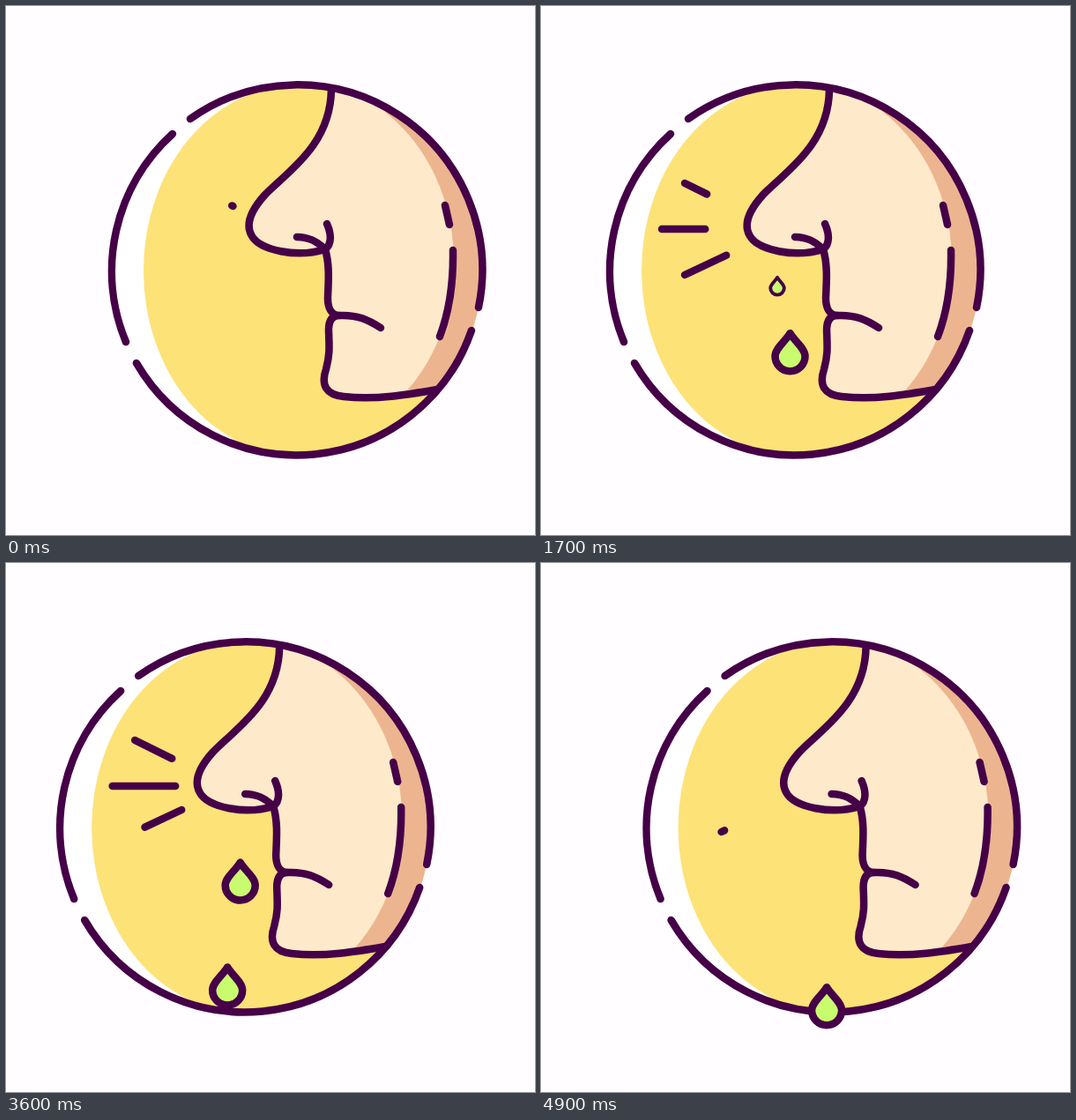
These frames come from a looping animation (600 by 600 pixels, 5 s). An HTML page:

```html
<!DOCTYPE html>
<html lang="en">
<head>
<meta charset="utf-8">
<title>Runny nose</title>
<style>
  html, body { margin: 0; width: 100%; height: 100%; overflow: hidden; background: #fffdff; }
  svg { display: block; width: 100vw; height: 100vh; }
  .ink { fill: none; stroke: #450048; stroke-width: 8.5; stroke-linecap: round; stroke-linejoin: round; }
  .drop { fill: #c9fb6e; }
</style>
</head>
<body>
<svg viewBox="0 0 600 600">
  <defs>
    <clipPath id="disc"><circle cx="330" cy="300" r="210"/></clipPath>
    <clipPath id="face"><use href="#skin"/></clipPath>
    <path id="skin" d="M369 95C368 160 316 190 293 215C277 233 271 248 279 261C288 277 330 286 362 276
      C367 292 366 310 365 331C365 342 369 351 378 351C369 351 366 358 366 368C367 390 367 397 363 412
      C357 430 363 441 383 443C420 447 455 441 489 435L560 435V60H369Z"/>
  </defs>
  <g id="scene">
    <g clip-path="url(#disc)">
      <circle cx="330" cy="300" r="210" fill="#fff"/>
      <ellipse cx="330" cy="300" rx="174" ry="210" fill="#fde278"/>
      <path d="M330 300V510H540V90H330Z" fill="#fde278"/>
      <use href="#skin" fill="#ecb58f"/>
      <ellipse cx="330" cy="290" rx="178" ry="205" fill="#feeaca" clip-path="url(#face)"/>
    </g>
    <path class="ink" d="M209 128A210 210 0 0 1 536 342M528 368A210 210 0 0 1 148 405M136 381A210 210 0 0 1 189 145"/>
    <path class="ink" d="M369 95C368 160 316 190 293 215C277 233 271 248 279 261C288 277 330 286 362 276
      C367 292 366 310 365 331C365 342 369 351 378 351C369 351 366 358 366 368C367 390 367 397 363 412
      C357 430 363 441 383 443C420 447 455 441 489 435"/>
    <path class="ink" d="M378 351C399 350 411 356 425 365M330 262C345 262 354 268 362 276C370 270 369 258 364 247"/>
    <path class="ink" d="M498 226L503 248M507 277Q508 333 492 375"/>
  </g>
</svg>
<script>
const LOOP = 5000, FRAME = 1000 / 30, STEP = 100, LEAD = 25;
const TRIM = 34 * FRAME, STAGGER = 7 * FRAME;
const scene = document.getElementById("scene");

function add(tag, cls) {
  const el = document.createElementNS("http://www.w3.org/2000/svg", tag);
  el.setAttribute("class", cls);
  scene.append(el);
  return el;
}

// Breath lines, drawn from the nose outwards: [x, y, dx, dy]
const lines = [[257.5, 227, -52.5, -26], [251, 253, -72, 0], [258, 280, -53, 25]]
  .map(way => ({ way, el: add("path", "ink") }));

const drops = [[324.5, 15], [310, 49], [324.5, 83]].map(([x, start]) => {
  const el = add("path", "ink drop");
  el.setAttribute("d", "M0 0C-5 9-17 17-17 26A17 17 0 0 0 17 26C17 17 5 9 0 0Z");
  el.style.fill = "#c9fb6e";
  return { x, start: start * FRAME, el };
});

const clamp = v => Math.max(0, Math.min(1, v));

// cubic-bezier(.42, 0, .58, 1)
function ease(u) {
  let lo = 0, hi = 1;
  for (let i = 0; i < 24; i++) {
    const s = (lo + hi) / 2, r = 1 - s;
    if (1.26 * s * r * r + 1.74 * s * s * r + s ** 3 < u) lo = s; else hi = s;
  }
  return lo * lo * (3 - 2 * lo);
}

function draw(t) {
  const swing = t % 2500 / 1250;
  const shift = -60 * ease(swing < 1 ? swing : 2 - swing);
  scene.setAttribute("transform", `translate(${shift} 0)`);

  lines.forEach(({ way: [x, y, dx, dy], el }, i) => {
    let age = t - i * STAGGER;
    if (age >= 2 * TRIM) age -= 2 * TRIM;
    const head = clamp(age / TRIM), tail = clamp(age / TRIM - 1);
    const at = k => `${x + dx * k} ${y + dy * k}`;
    el.setAttribute("d", head > tail ? `M${at(tail)}L${at(head)}` : "");
  });

  for (const { x, start, el } of drops) {
    const age = t - start;
    const size = clamp(Math.min(age / 200, (2 * TRIM - age) / 70));
    const y = 291.5 + 0.035 * age + 0.0000245 * age * age;
    el.setAttribute("transform", `translate(${x} ${y + 24}) scale(${size}) translate(0 -24)`);
    el.style.display = size > 0 ? "" : "none";
  }
}

function tick() {
  const now = performance.now() + 8;
  draw((Math.floor(now / STEP) * STEP + LEAD) % LOOP);
  requestAnimationFrame(tick);
}
tick();
</script>
</body>
</html>
```
